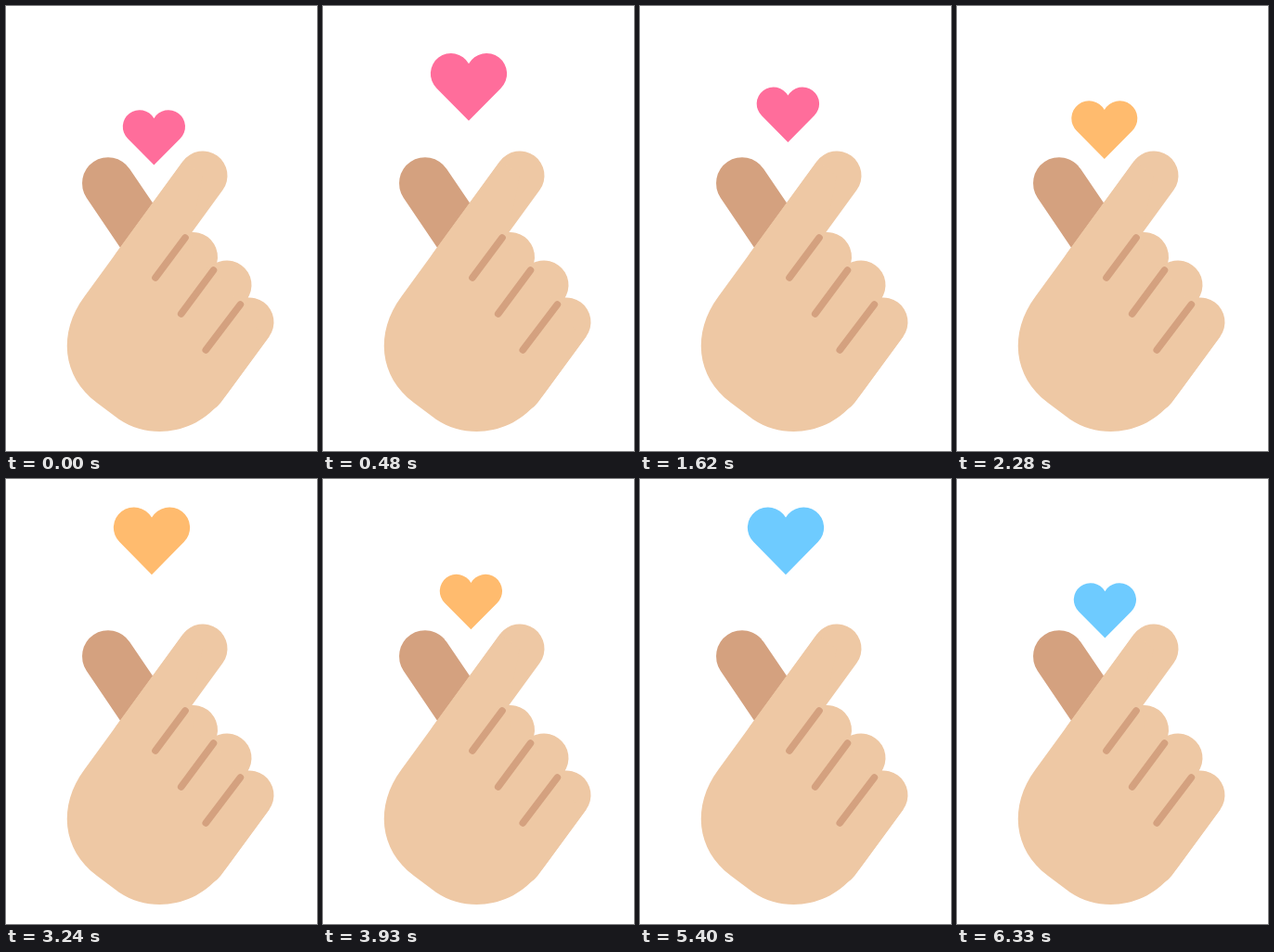
Animation of 335 by 480 pixels, one loop 6480 ms. Source, as an HTML page:

```html
<!DOCTYPE html>
<html lang="en">
<head>
<meta charset="utf-8">
<title>Finger heart</title>
<style>
  html, body { margin: 0; width: 100%; height: 100%; overflow: hidden; background: #fff; }
  svg { display: block; width: 335px; height: 480px; }
  .skin { fill: #eec8a4; }
  .finger { stroke: #eec8a4; stroke-width: 53; }
  .shade { stroke: #d4a17f; }
  path { fill: none; stroke-linecap: round; }
</style>
</head>
<body>
<svg viewBox="0 0 335 480">
  <path class="shade" stroke-width="56" d="M110 191.3L151 252"/>
  <path class="finger" d="M212 183L140 282M201.5 270.5L150 341M238 301L180 380M262 341L210 412"/>
  <path class="skin" d="M190.6 167.4L84.2 313.8C56 352 60 400 98 428L122 446
    C155 468 203 462 230 428L238 418.5L283.4 356.6L262 341L238 301L202 270L199.5 245L212 183Z"/>
  <path class="shade" stroke-width="7.6" d="M193 250L161 293M223.5 285L188.7 332M252.4 322L215.3 371"/>
  <path id="heart" d="M0 36.5L-34.6 1.4A22 22 0 1 1 0 -25.1A22 22 0 1 1 34.6 1.4Z"/>
</svg>
<script>
  const heart = document.getElementById('heart');
  const colors = ['#ff6d9b', '#ffbb6e', '#6ecbff'];
  const BEAT = 2160, FALL_START = 1175;

  // Smooth 0 to 1 with a quick start and a softer landing.
  const ease = (t, duration) => {
    const u = Math.min(Math.max(t / duration, 0), 1);
    return (1 - Math.cos(Math.PI * u ** 0.8)) / 2;
  };
  const upAndBack = (t, duration) => ease(t, duration) - ease(t - FALL_START, duration);
  const mix = (a, b, k) => a + (b - a) * k;

  function draw(now) {
    const t = now % BEAT;
    const rise = upAndBack(t, 825), grow = upAndBack(t, 480);
    const x = mix(159.4, 157, grow), y = mix(141.8, 66.7, rise), scale = mix(0.817, 1, grow);
    heart.setAttribute('transform', `translate(${x} ${y}) scale(${scale})`);
    heart.style.fill = colors[Math.floor(now / BEAT) % colors.length];
  }

  const start = performance.now();
  function tick() {
    draw(performance.now() - start);
    requestAnimationFrame(tick);
  }
  tick();
</script>
</body>
</html>
```
